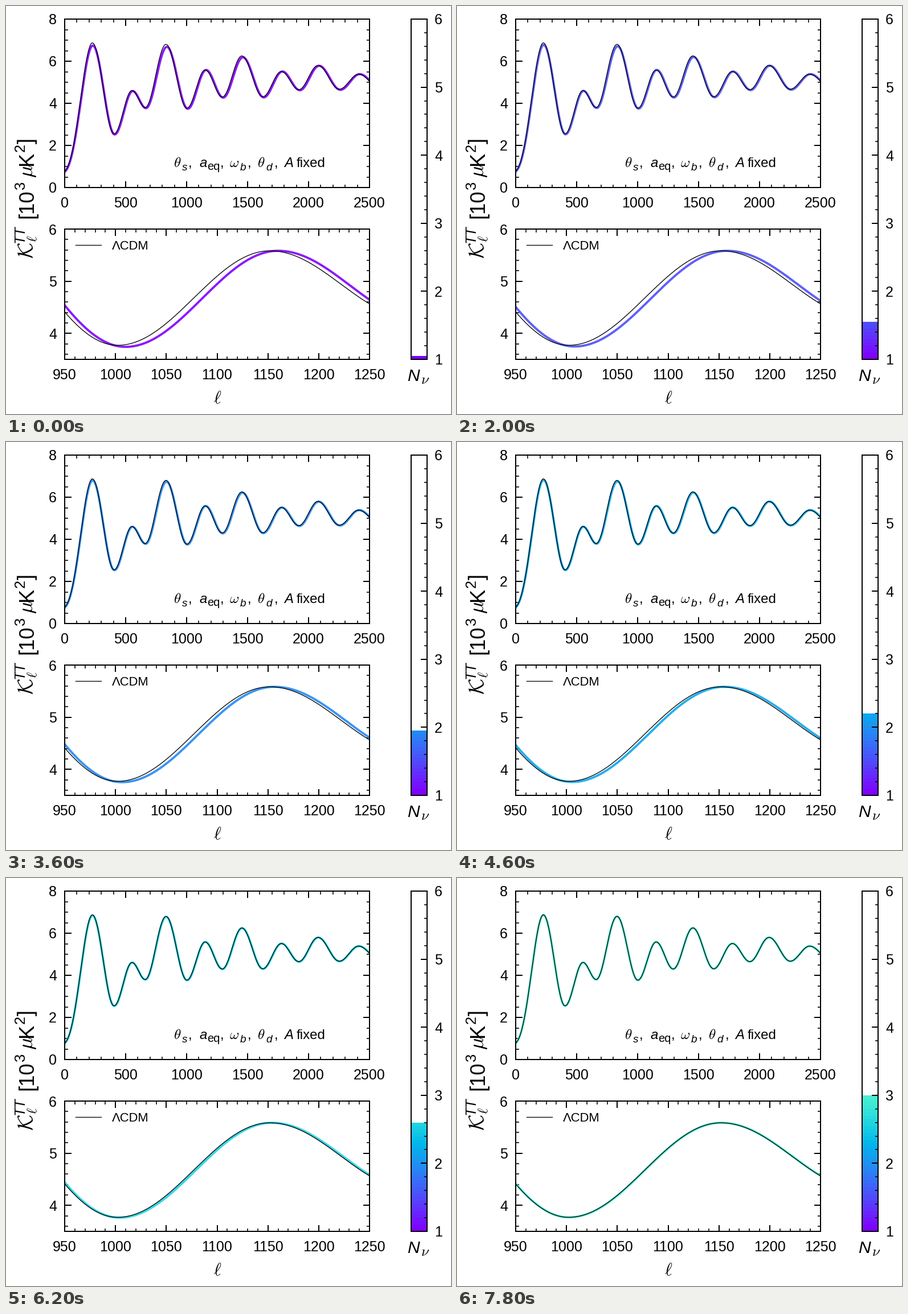
Animation, 781 px wide and 717 px high, one loop 8 s. Source, as a matplotlib script:

```python
import numpy as np
import matplotlib.pyplot as plt
from matplotlib.animation import FuncAnimation
from matplotlib.patches import Rectangle
from matplotlib.ticker import MultipleLocator

W, H, DPI = 781, 717, 64
PT = 72 / DPI                      # points per pixel
FRAMES, STEP_MS = 40, 200
N_STEP, N_REF = 0.05, 3.046

plt.rcParams["font.family"] = "Liberation Sans"

# Key points of the spectrum: alternating troughs and peaks
TURN_X = np.array([-30, 227, 405, 552, 660, 831, 1002, 1152, 1292,
                   1453, 1624, 1777, 1920, 2078, 2252, 2411, 2590])
TURN_Y = np.array([0.72, 6.87, 2.55, 4.61, 3.8, 6.8, 3.77, 5.583, 4.3,
                   6.25, 4.31, 5.51, 4.65, 5.8, 4.67, 5.385, 4.7])


def spectrum(ell, n):
    """Half-cosine arcs; fewer neutrinos move them right and lower the high peaks."""
    k = (N_REF - n) / (N_REF - 1)
    x = TURN_X + 9 * k * (1 - np.exp(-np.maximum(TURN_X, 0) / 500))
    y = TURN_Y - k * (0.1 * np.maximum(TURN_Y - 5.6, 0) + 0.03 * (TURN_Y < 5))
    i = np.clip(np.searchsorted(x, ell) - 1, 0, len(x) - 2)
    u = (ell - x[i]) / (x[i + 1] - x[i])
    u = np.where(i == 0, u ** 1.3, u)
    return y[i] + (y[i + 1] - y[i]) * (1 - np.cos(np.pi * u)) / 2


fig = plt.figure(figsize=(W / DPI, H / DPI), dpi=DPI, facecolor="white")


def panel(x0, y0, x1, y1, xlim, ylim):
    ax = fig.add_axes([x0 / W, 1 - y1 / H, (x1 - x0) / W, (y1 - y0) / H])
    ax.set(xlim=xlim, ylim=ylim)
    for spine in ax.spines.values():
        spine.set_linewidth(2 * PT)
    ax.tick_params(which="both", direction="in", top=True, right=True)
    ax.tick_params(which="major", length=11.5 * PT, width=2 * PT, labelsize=25 * PT)
    ax.tick_params(which="minor", length=5.5 * PT, width=1.6 * PT)
    ax.tick_params(axis="x", pad=16 * PT)
    ax.tick_params(axis="y", pad=14 * PT)
    return ax


def ticks(axis, major, minor):
    axis.set_major_locator(MultipleLocator(major))
    axis.set_minor_locator(MultipleLocator(minor))


def put(x, y, s, size, italic=False, rotation=0):
    """Text with its baseline start at pixel (x, y), measured from the top left."""
    fig.text(x / W, 1 - y / H, s, fontsize=size * PT, rotation=rotation,
             style="italic" if italic else "normal", math_fontfamily="cm",
             ha="left", va="baseline", rotation_mode="anchor")


def put_row(y, size, pieces, italic=False):
    for s, x in pieces.items():
        put(x, y, s, size, italic)


def put_column(x, size, pieces, italic=False):
    for s, y in pieces.items():
        put(x, y, s, size, italic, rotation=90)


full = panel(103, 23, 638, 319, (0, 2500), (0, 8))
ticks(full.xaxis, 500, 100)
ticks(full.yaxis, 2, 0.5)

zoom = panel(103, 392, 638, 621, (950, 1250), (3.5, 6))
ticks(zoom.xaxis, 50, 10)
ticks(zoom.yaxis, 1, 0.2)

bar = panel(711, 23, 739, 621, (0, 1), (1, 6))
bar.set_xticks([])
ticks(bar.yaxis, 1, 0.2)
bar.tick_params(axis="y", which="both", left=False, labelleft=False, labelright=True)
bar.tick_params(axis="y", pad=13 * PT)

# Curves
BLACK = dict(color="black", lw=1.3 * PT, zorder=2.2)
curves = []
for ax in (full, zoom):
    ell = np.linspace(*ax.get_xlim(), 1200)
    line, = ax.plot([], [], lw=3.9 * PT, alpha=0.9, zorder=2)
    ax.plot(ell, spectrum(ell, N_REF), **BLACK)
    curves.append((line, ell))

# Colour bar cells
cmap = plt.get_cmap("rainbow")
colors = [cmap(i * N_STEP / 5) for i in range(FRAMES)]
cells = [bar.add_patch(Rectangle((0, 1 + i * N_STEP), 1, N_STEP, fc=c, lw=0,
                                 antialiased=False, zorder=1))
         for i, c in enumerate(colors)]

# Note in the upper panel
for x in (294, 441):
    put(x, 283, r"$\theta$", 25)
for x in (320, 376, 424, 471):
    put(x, 283, ",", 24)
put_row(283, 25, {r"$\omega$": 392})
put_row(283, 24, {"a": 339, "A": 488}, italic=True)
put_row(283, 24, {"fixed": 510})
put_row(289, 19, {"s": 309, "b": 411, "d": 456}, italic=True)
put_row(288, 20, {"eq": 353})

# Legend
zoom.plot([0.035, 0.12], [0.878, 0.878], transform=zoom.transAxes, **BLACK)
put(185.5, 428, "ΛCDM", 22)

# Axis names
put(364, 698, r"$\ell$", 31)
put(704, 659, "N", 30, italic=True)
put(728, 664, r"$\nu$", 25)
put_column(47, 36.5, {r"$\mathcal{K}$": 444, "[10": 373, r"$\mu$": 302, "K": 280, "]": 242})
put_column(33, 25.5, {"3": 323, "2": 256})
put_column(32, 25, {"TT": 416}, italic=True)
put_column(54, 25, {r"$\ell$": 415})


def draw(i):
    for line, ell in curves:
        line.set_data(ell, spectrum(ell, 1 + i * N_STEP))
        line.set_color(colors[i])
    for j, cell in enumerate(cells):
        cell.set_visible(j <= i)
    return [line for line, _ in curves] + cells


anim = FuncAnimation(fig, draw, frames=FRAMES, interval=STEP_MS,
                     init_func=lambda: draw(0), repeat=True, repeat_delay=0, blit=False)
plt.show()
```
